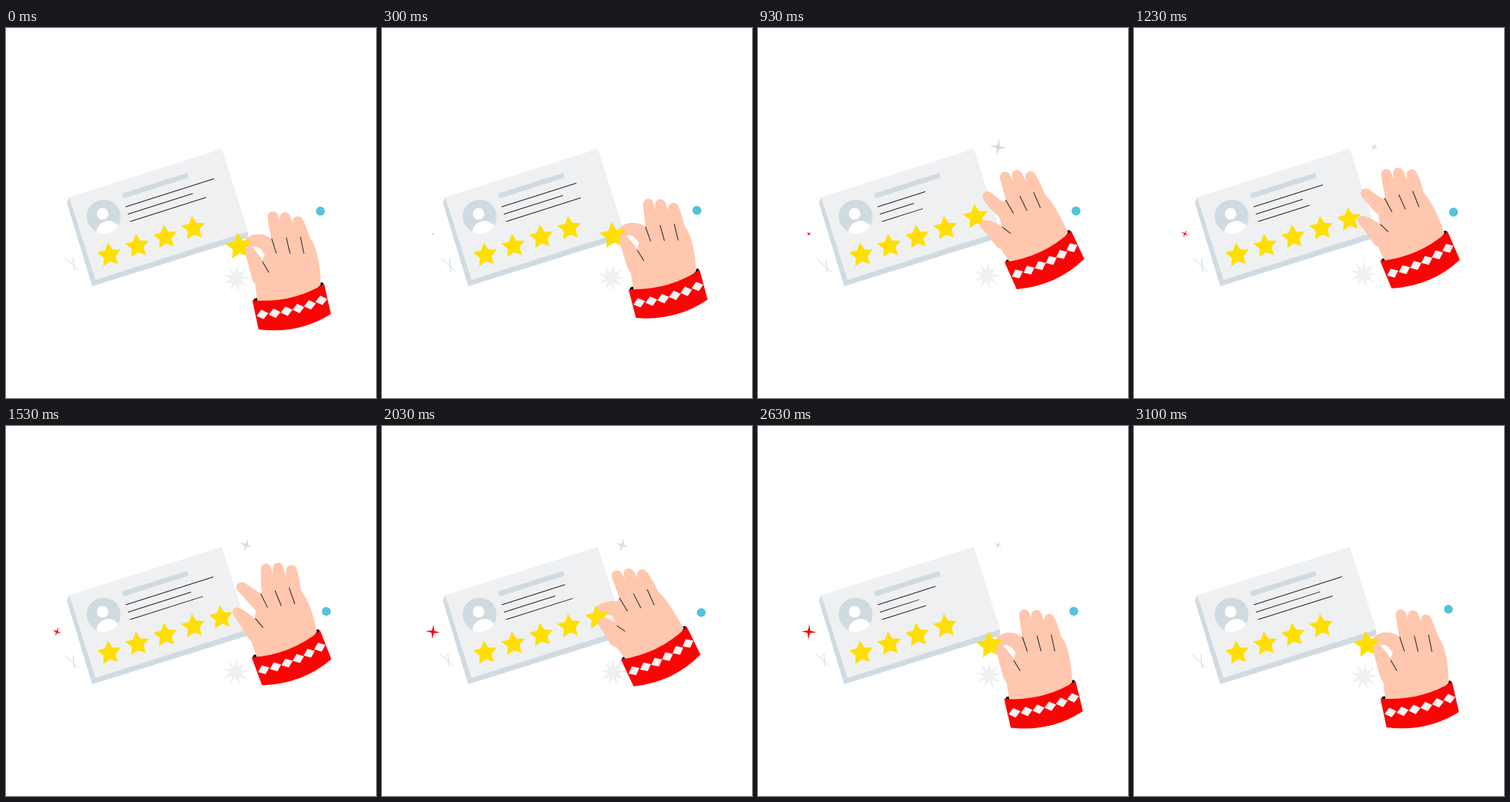
Animation of 480 by 480 pixels, one loop 3130 ms. Source, as an HTML page with a canvas:

```html
<!DOCTYPE html>
<html lang="en">
<head>
<meta charset="utf-8">
<title>Five star review</title>
<style>
html, body { margin: 0; width: 100%; height: 100%; overflow: hidden; background: #fff; }
canvas { display: block; width: 480px; height: 480px; }
</style>
</head>
<body>
<canvas id="c" width="480" height="480"></canvas>
<script>
const ctx = document.getElementById('c').getContext('2d');
const LOOP = 3130, FRAMES = 94, TAU = Math.PI * 2, RAD = Math.PI / 180;
const SKIN = '#ffc7ae', RED = '#fa0506', PALE = '#eff0f2', STEEL = '#d0dbe1',
      GOLD = '#ffdf00', INK = '#262626', TEAL = '#55c3d9';
const SLOT = { x: 279.2, y: 248.5 };

// Wrist stops along the loop
const WRIST = [
  { t: 0, x: 366.5, y: 343, deg: -13.5 },
  { t: 130, x: 367.5, y: 350, deg: -13 },
  { t: 570, x: 364, y: 279.5, deg: -21.3 },
  { t: 930, x: 363.5, y: 284, deg: -25.8 },
  { t: 1530, x: 363.5, y: 283, deg: -22 },
  { t: 2030, x: 353, y: 282, deg: -27 },
  { t: 2780, x: 367.5, y: 350, deg: -13 },
  { t: LOOP, x: 366.5, y: 343, deg: -13.5 }
];

const lerp = (a, b, u) => a + (b - a) * u;
const wave = (t, delay, period = LOOP) => Math.cos(TAU * (t - delay) / period);

function ramp(t, from, to) {
  const u = Math.min(1, Math.max(0, (t - from) / (to - from)));
  return u * u * (3 - 2 * u);
}

function poly(color, pts) {
  ctx.fillStyle = color;
  ctx.beginPath();
  pts.forEach(p => ctx.lineTo(p[0], p[1]));
  ctx.closePath();
  ctx.fill();
}

function dot(color, x, y, r) {
  ctx.fillStyle = color;
  ctx.beginPath();
  ctx.arc(x, y, r, 0, TAU);
  ctx.fill();
}

function line(color, x0, y0, x1, y1) {
  ctx.strokeStyle = color;
  ctx.lineWidth = 1;
  ctx.beginPath();
  ctx.moveTo(x0, y0);
  ctx.lineTo(x1, y1);
  ctx.stroke();
}

function burst(color, x, y, n, r, inner, deg) {
  const pts = [];
  for (let i = 0; i < n * 2; i++) {
    const a = (deg - 90) * RAD + i * Math.PI / n, q = i % 2 ? inner : r;
    pts.push([x + q * Math.cos(a), y + q * Math.sin(a)]);
  }
  poly(color, pts);
}

const star = (x, y, r, deg) => burst(GOLD, x, y, 5, r, r * 0.5, deg);

function placed(x, y, deg, draw) {
  ctx.save();
  ctx.translate(x, y);
  ctx.rotate(deg * RAD);
  draw();
  ctx.restore();
}

// Tapered round finger along a quadratic curve
function limb(ax, ay, cx, cy, bx, by, r0, r1) {
  for (let i = 0; i <= 40; i++) {
    const u = i / 40;
    dot(SKIN, lerp(lerp(ax, cx, u), lerp(cx, bx, u), u),
      lerp(lerp(ay, cy, u), lerp(cy, by, u), u), lerp(r0, r1, u));
  }
}

function card(t) {
  const w = 207.7, h = 112.6;
  poly(STEEL, [[0, 0], [-5, 6], [-6.5, h + 6.5], [w - 3, h + 7.5], [w, h]]);
  ctx.fillStyle = PALE;
  ctx.fillRect(0, 0, w, h);
  ctx.fillStyle = STEEL;
  ctx.fillRect(66.7, 16.3, 88.6, 6.4);

  dot(STEEL, 35, 37.5, 22);
  ctx.save();
  ctx.beginPath();
  ctx.arc(35, 37.5, 22.3, 0, TAU);
  ctx.clip();
  ctx.fillStyle = '#fff';
  ctx.beginPath();
  ctx.ellipse(34.6, 57.6, 15, 13.5, 0, 0, TAU);
  ctx.fill();
  ctx.restore();
  dot('#fff', 34.8, 33.6, 7.5);

  [120.5, 89, 107].forEach((len, i) => {
    const y = 34 + 10 * i;
    line(INK, 66, y, 66 + len * (0.757 + 0.243 * wave(t, 68 * i, LOOP / 2)), y);
  });
  for (let i = 0; i < 4; i++) star(27 + 38.1 * i, 87.2, 16.2, 10.5);
}

function decor(t) {
  dot(TEAL, 411.7 - 3.8 * wave(t, 0), 239.2 - 2.8 * wave(t, 480), 5.8);
  burst(PALE, 298.5 + 1.5 * wave(t, 2350), 322 + 3 * wave(t, 0), 9, 18, 7, 5 + 5 * wave(t, 600));

  const m = wave(t, 750), x = 85.5 + 1.5 * m, y = 306 + 3 * m;
  line(STEEL, x - 10, y - 9, x + 9, y + 8);
  line(STEEL, x + 1, y - 9, x + 3, y + 8);

  if (t > 540 && t < 3060) {
    const s = Math.abs(Math.sin(Math.PI * (t - 540) / 560));
    const r = 13 * s * (1 - 0.45 * (t - 540) / 2500);
    burst(STEEL, 311.5, 154.5, 4, r, r * 0.22, (1 - r / 13) * 55);
  }
  if (t > 40 && t < 3070) {
    const s = Math.abs(Math.sin(Math.PI * t / 313));
    burst(RED, 66, 267, 4, 10 * s, 2.3 * s, 3 + (1 - s) * 45);
  }
}

function palm(lean, k, open) {
  const edge = 1.2 * k;
  ctx.fillStyle = SKIN;
  ctx.beginPath();
  ctx.moveTo(-42, 3);
  ctx.quadraticCurveTo(-40 + k * 0.8, -18, -38 + k, -32);
  ctx.lineTo(-24 + k, -47);
  ctx.lineTo(-15 + 2 * k, -60);
  ctx.lineTo(-5 + k, -74);
  ctx.lineTo(36 + edge, -72);
  ctx.bezierCurveTo(49 + edge, -62, 51 + edge, -36, 43, 0);
  ctx.quadraticCurveTo(0, 30, -42, 3);
  ctx.fill();

  // Middle, ring and little finger
  for (let i = 0; i < 3; i++) {
    const root = 4 + 13.5 * i + k, tip = 3.2 + 15 * i + lean;
    const top = -100.5 + 2.5 * i + 2.2 * i * i;
    limb(root, -62 + 3 * i, lerp(root, tip, 0.5) + i, top + 17, tip, top, 10 + i, 6.6);
  }
  limb(-9 + 1.4 * k, -60, -18 + 1.2 * k, -79 - 1.4 * k,
    -34 + 9 * open + 0.9 * k, -75 - 16 * open - 0.5 * k, 10.5, 6.5);
}

function thumb(k, open) {
  const x = -36.5 - 5.5 * open + 1.3 * k;
  limb(-29 + k * 1.15, -28, (x - 30 + k) / 2, -50, x, -64 - 1.2 * k, 12.5, 5.8);
  for (let i = 0; i < 3; i++) line(INK, -5 + 19 * i + k - i * i / 4, -73 + 3.2 * i, -3.5 + 17.3 * i + k, -53 + 4.4 * i);
  line(INK, -23.5 + k * 1.1, -46.5 - k * 0.5, -18.8 + k * 0.9, -31);
}

function cuff() {
  ctx.fillStyle = RED;
  ctx.beginPath();
  ctx.moveTo(-48, -1);
  ctx.quadraticCurveTo(0, 15, 47.5, 0);
  ctx.lineTo(47, 40);
  ctx.quadraticCurveTo(0, 56, -49, 37.5);
  ctx.closePath();
  ctx.fill();
  for (let i = 0; i < 6; i++) {
    const x = -39.5 + 15.7 * i, y = 23.3 - 3.5 * x * x / 1600;
    burst('#f4f4f4', x, y, 2, 6.3, 7.9, 0);
  }
}

function hand(t) {
  const i = WRIST.findIndex(p => p.t > t), a = WRIST[i - 1], b = WRIST[i];
  const u = ramp(t, a.t, b.t);
  const x = lerp(a.x, b.x, u), y = lerp(a.y, b.y, u), deg = lerp(a.deg, b.deg, u);

  // Fingers and knuckles swing with the wrist
  const bend = -deg - 21.3;
  const lean = 11.5 - Math.abs(bend) * (bend > 0 ? 3.2 : 1.47);
  const k = -1.5 * Math.max(0, bend);
  const open = ramp(t, 600, 900) - ramp(t, 1600, 2000);
  const hold = 1 - ramp(t, 650, 1080) + ramp(t, 2030, 2250);

  const c = Math.cos(deg * RAD), s = Math.sin(deg * RAD), gx = -48.5, gy = -73;
  placed(x, y, deg, () => {
    poly('#000', [[-47, 0], [-45, -2.5], [45.5, -2.5], [47, 0], [40, 5], [-40, 5]]);
    palm(lean, k, open);
  });
  star(lerp(SLOT.x, x + c * gx - s * gy, hold), lerp(SLOT.y, y + s * gx + c * gy, hold),
    16.2 + 1.8 * hold, -7);
  placed(x, y, deg, () => {
    thumb(k, open);
    cuff();
  });
}

const start = performance.now();

function draw() {
  const now = Math.max(0, performance.now() - start) % LOOP;
  const t = Math.floor(now * FRAMES / LOOP) * LOOP / FRAMES;
  ctx.fillStyle = '#fff';
  ctx.fillRect(0, 0, 480, 480);
  decor(t);
  placed(82, 219.5, -17.6, () => card(t));
  hand(t);
  requestAnimationFrame(draw);
}
draw();
</script>
</body>
</html>
```
